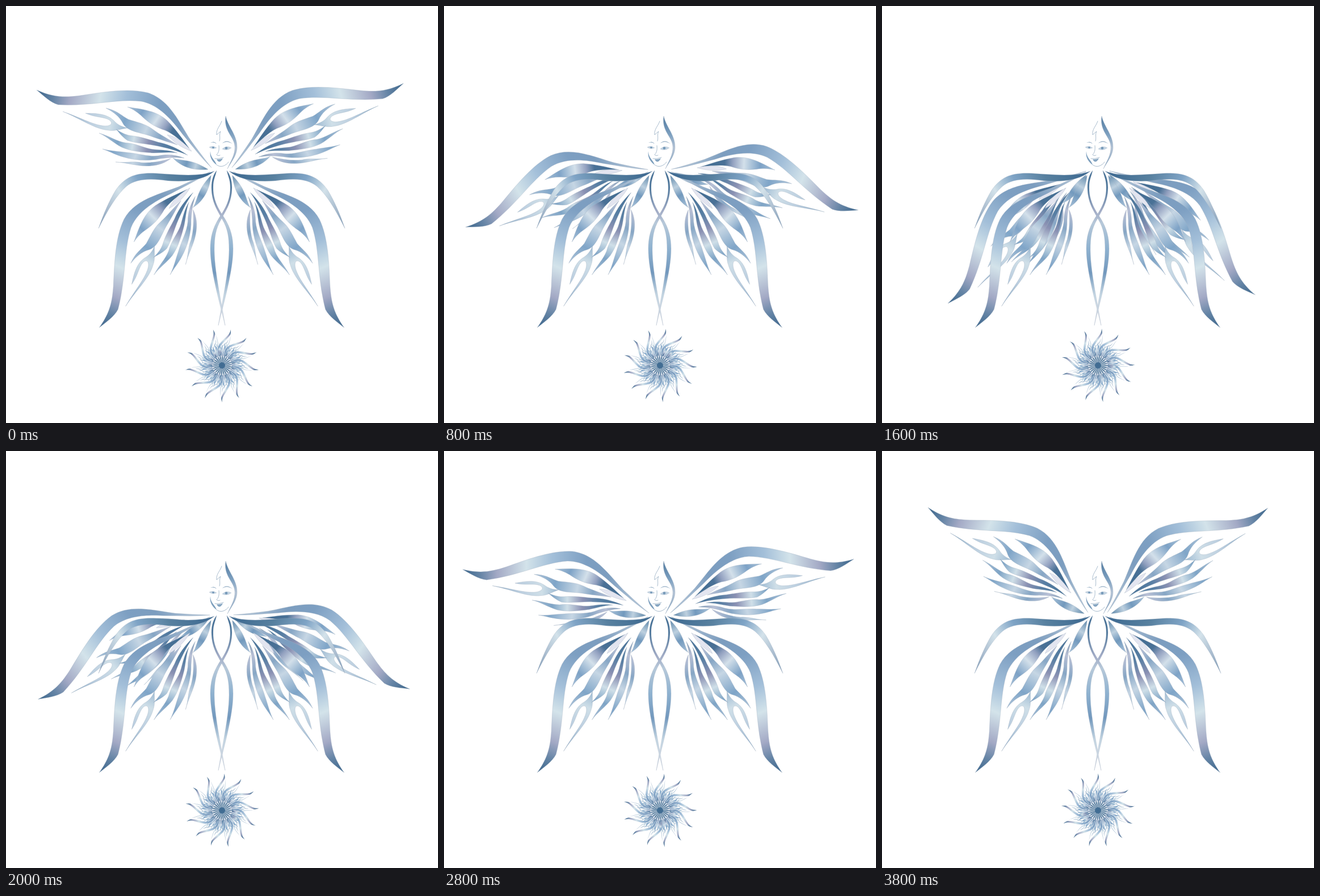
Animation of 761 by 735 pixels, one loop 4000 ms. Source, as an HTML page:

```html
<!DOCTYPE html>
<html lang="en">
<head>
<meta charset="utf-8">
<title>Winged figure</title>
<style>
html, body { margin: 0; width: 100%; height: 100%; overflow: hidden; background: #fff; }
svg { display: block; width: 761px; height: 735px; }
.thin { fill: none; stroke: #93abc1; stroke-width: .8; stroke-linecap: round; }
.edge { stroke: #a3b2c2; stroke-width: .35; }
</style>
</head>
<body>
<svg viewBox="0 0 761 735">
<defs>
  <linearGradient id="gBand" gradientUnits="userSpaceOnUse" x1="54" y1="150" x2="350" y2="210">
    <stop offset="0" stop-color="#3b658b"/><stop offset=".1" stop-color="#6484a5"/>
    <stop offset=".2" stop-color="#a3a9c5"/><stop offset=".37" stop-color="#d3e3ea"/>
    <stop offset=".52" stop-color="#a3bfd9"/><stop offset=".72" stop-color="#7d9fc2"/>
    <stop offset=".85" stop-color="#7c9dbf"/><stop offset="1" stop-color="#a9bed3"/>
  </linearGradient>
  <linearGradient id="gWedge" gradientUnits="userSpaceOnUse" x1="214" y1="178" x2="323" y2="251">
    <stop offset="0" stop-color="#a9c2d9"/><stop offset=".2" stop-color="#7da2c6"/>
    <stop offset=".42" stop-color="#d3e0ea"/><stop offset=".57" stop-color="#93a1c0"/>
    <stop offset=".68" stop-color="#4a7196"/><stop offset="1" stop-color="#3f6b92"/>
  </linearGradient>
  <linearGradient id="gBlue" gradientUnits="userSpaceOnUse" x1="165" y1="195" x2="328" y2="260">
    <stop offset="0" stop-color="#b5c9dc"/><stop offset=".25" stop-color="#7fa5c8"/>
    <stop offset=".48" stop-color="#c6d6e4"/><stop offset=".64" stop-color="#86a6c5"/>
    <stop offset=".8" stop-color="#b9c0d6"/><stop offset="1" stop-color="#57809f"/>
  </linearGradient>
  <linearGradient id="gViolet" gradientUnits="userSpaceOnUse" x1="165" y1="230" x2="328" y2="264">
    <stop offset="0" stop-color="#a8c0d7"/><stop offset=".2" stop-color="#7ea4c6"/>
    <stop offset=".36" stop-color="#cfdfe8"/><stop offset=".52" stop-color="#8b91b3"/>
    <stop offset=".68" stop-color="#587fa4"/><stop offset="1" stop-color="#416d93"/>
  </linearGradient>
  <linearGradient id="gPale" gradientUnits="userSpaceOnUse" x1="100" y1="186" x2="222" y2="214">
    <stop offset="0" stop-color="#86a7c4"/><stop offset=".4" stop-color="#bccfe0"/>
    <stop offset=".7" stop-color="#cfdfe8"/><stop offset="1" stop-color="#8cadcb"/>
  </linearGradient>
  <linearGradient id="gLeaf" gradientUnits="userSpaceOnUse" x1="294" y1="268" x2="356" y2="288">
    <stop offset="0" stop-color="#a9c3da"/><stop offset=".4" stop-color="#7299bd"/>
    <stop offset=".65" stop-color="#bdd0df"/><stop offset="1" stop-color="#5d87aa"/>
  </linearGradient>
  <linearGradient id="gFeather" gradientUnits="userSpaceOnUse" x1="163" y1="392" x2="350" y2="290">
    <stop offset="0" stop-color="#7b97b3"/><stop offset=".14" stop-color="#a9bccf"/>
    <stop offset=".3" stop-color="#d3e2ea"/><stop offset=".48" stop-color="#7fa4c6"/>
    <stop offset=".72" stop-color="#57809f"/><stop offset="1" stop-color="#3f6b92"/>
  </linearGradient>
  <linearGradient id="gBody" gradientUnits="userSpaceOnUse" x1="0" y1="290" x2="0" y2="563">
    <stop offset="0" stop-color="#3f6b92"/><stop offset=".12" stop-color="#4c769b"/>
    <stop offset=".26" stop-color="#a2abc6"/><stop offset=".34" stop-color="#b7c9da"/>
    <stop offset=".5" stop-color="#8fb2d0"/><stop offset=".66" stop-color="#7298bd"/>
    <stop offset=".8" stop-color="#c3d5e2"/><stop offset="1" stop-color="#e2e4ec"/>
  </linearGradient>
  <linearGradient id="gHair" x1="0" y1="0" x2="0" y2="1">
    <stop offset="0" stop-color="#527ba0"/><stop offset=".35" stop-color="#7da0c0"/>
    <stop offset=".6" stop-color="#b5c4d6"/><stop offset="1" stop-color="#7d9fbd"/>
  </linearGradient>
  <radialGradient id="gCore">
    <stop offset="0" stop-color="#3f6b92"/><stop offset=".6" stop-color="#4b7498"/>
    <stop offset="1" stop-color="#7f93b5" stop-opacity="0"/>
  </radialGradient>

  <g id="wing" class="edge">
    <path fill="url(#gBand)" d="M54 148C85 162 105 161 130 158C170 152 215 144 250 153C288 165 305 205 325 236C338 254 350 270 362 285C345 269 327 245 311 226C294 203 270 174 238 168C195 163 150 177 92 174C78 170 66 158 54 148Z"/>
    <path fill="url(#gPale)" d="M100 186C130 196 150 208 170 211C184 213 190 207 182 201C172 195 158 197 140 189C160 189 178 190 190 202C196 209 204 213 214 215C200 217 192 221 180 219C156 217 130 198 100 186Z"/>
    <path fill="url(#gWedge)" d="M214 178C240 182 264 184 284 202C300 218 312 236 323 251C308 238 296 226 280 219C262 213 252 206 241 196C232 187 224 182 214 178Z"/>
    <path fill="#e3e5f0" d="M284 227C300 230 314 241 327 256C310 250 296 241 284 227Z"/>
    <path fill="url(#gBlue)" d="M176 180C196 184 204 194 216 200C232 205 246 208 258 217C270 226 286 234 302 245C284 239 270 235 254 229C238 223 214 222 206 207C200 195 190 187 176 180Z"/>
    <path fill="url(#gViolet)" d="M194 217C204 224 212 228 224 229C240 231 254 236 268 240C288 244 304 252 320 263C302 255 286 251 268 247C250 243 228 242 214 237C206 232 199 223 194 217Z"/>
    <path fill="url(#gViolet)" d="M164 224C184 230 194 238 210 241C230 242 246 252 262 253C276 254 288 254 302 259C286 257 274 259 260 259C240 258 220 256 204 249C190 242 178 230 164 224Z"/>
    <path fill="url(#gBlue)" d="M170 252C186 256 198 256 212 258C234 260 250 266 268 264C284 261 298 262 314 268C298 266 288 267 272 269C250 274 226 272 206 266C192 262 182 256 170 252Z"/>
    <path fill="url(#gBlue)" d="M193 275C212 277 222 273 238 276C256 277 272 274 290 269C280 277 266 282 248 282C228 282 214 276 193 275Z"/>
    <path fill="url(#gLeaf)" d="M294 268C308 274 325 268 356 288C336 290 312 287 294 268Z"/>
  </g>
  <path id="feather" class="edge" fill="url(#gFeather)" d="M367 291C340 302 300 297 265 295C230 293 210 300 193 325C182 343 172 366 163 392C180 358 195 333 212 318C230 303 258 304 285 308C320 311 350 306 367 291Z"/>
  <g id="lower">
    <use href="#wing" transform="rotate(-78.6 365 290)"/>
    <use href="#feather"/>
  </g>
  <path id="strand" class="edge" fill="url(#gBody)" d="M371 290C366 296 362 306 362 320C362 346 373 361 381 376C391 393 393 408 393 430C393 468 380 525 374 563C385 517 400 466 400 428C400 408 396 392 385 374C375 359 364 342 365 318C365 306 369 300 371 290Z"/>
</defs>

<use id="left" href="#wing"/>
<g transform="matrix(-1 0 0 1 760 0)"><use id="right" href="#wing"/></g>

<use href="#lower"/>
<use href="#lower" transform="matrix(-1 0 0 1 760 0)"/>
<use href="#strand"/>
<use href="#strand" transform="matrix(-1 0 0 1 760 0)"/>

<g id="head">
  <path class="edge" fill="url(#gHair)" d="M387 194C391 213 408 228 407 250C406 265 397 274 390 287C396 273 404 262 403 247C402 230 383 221 387 194Z"/>
  <path class="thin" d="M380 203C377 212 370 217 371 227L378 221C375 228 378 232 376 238"/>
  <path fill="#7d9fbd" d="M360 256C360 268 369 272 371 280C364 275 358 267 360 256Z"/>
  <path class="thin" d="M371 280C379 286 388 281 392 275M375 246C376 255 374 259 371 262Q373 265 377 263M368 269Q375 270 383 267"/>
  <path fill="#94adc4" d="M360 241Q367 237 371 243Q366 239.500 360 241ZM381 242Q389 234 399 243Q389 236.500 381 242Z"/>
  <path class="edge" fill="#c3d4e3" d="M358 249Q364 245 371 250Q364 253 358 249ZM381 252Q388 245 397 250Q389 256 381 252Z"/>
  <circle cx="365" cy="249.5" r="1.8" fill="#7598b8"/>
  <circle cx="388" cy="250.5" r="2.3" fill="#7598b8"/>
  <path fill="#86a6c2" d="M371 270Q376 271 382 268.500Q379 275 375 274.500Q372 273 371 270Z"/>
</g>

<g transform="translate(380.5 633.5)">
  <g id="flower"></g>
</g>
</svg>
<script>
const $ = id => document.getElementById(id);
const STEP = 200, LOOP = 4000, PETALS = 13, REST = -24.5;

// Wing angles below the horizontal, one per step
const leftAngles = [-24.5, -13.7, -2.9, 7.6, 17, 35.4, 43.3, 53, 43.3, 35.4,
  25.6, 17, 7.6, -2.9, -13.7, -24.5, -35.3, -47, -41.5, -33.8];
const rightAngles = [-26.7, -16.9, -6.1, 2.9, 11.8, 31.6, 40.1, 50, 39.9, 31.4,
  22.3, 11.8, 2.9, -6.1, -16.9, -26.7, -36.5, -48.8, -40.3, -33.6];
// Flower turn as [step, degrees]
const turns = [[0, 13.8], [2, 37.7], [6, 91.2], [10, 142.1], [14, 200.3],
  [16, 232.3], [19, 277], [20, 290.8]];

// Each petal is a small mirrored wing turned about its root
const petals = Array.from({ length: PETALS }, (_, i) =>
  `<use href="#lower" transform="rotate(${i * 360 / PETALS - 144.1}) scale(-.19 .19) translate(-365 -290)"/>`);
$('flower').innerHTML = petals.join('') +
  `<circle r="21" fill="url(#gCore)"/>
   <circle r="11.5" fill="none" stroke="#fff" stroke-width="12" pathLength="26" stroke-dasharray=".34 .66"/>`;

function turnAt(n) {
  const k = turns.findIndex(([s]) => s > n);
  const [s0, a0] = turns[k - 1], [s1, a1] = turns[k];
  return a0 + (a1 - a0) * (n - s0) / (s1 - s0);
}

function pose(el, angle) {
  el.setAttribute('transform', `rotate(${REST - angle} 365 290)`);
}

function draw(n) {
  pose($('left'), leftAngles[n]);
  pose($('right'), rightAngles[n]);
  $('flower').setAttribute('transform', `rotate(${turnAt(n)})`);
}

const start = performance.now();
let shown = -1;
function tick() {
  const n = Math.floor((performance.now() - start) % LOOP / STEP);
  if (n !== shown) draw(shown = n);
  requestAnimationFrame(tick);
}
tick();
</script>
</body>
</html>
```
